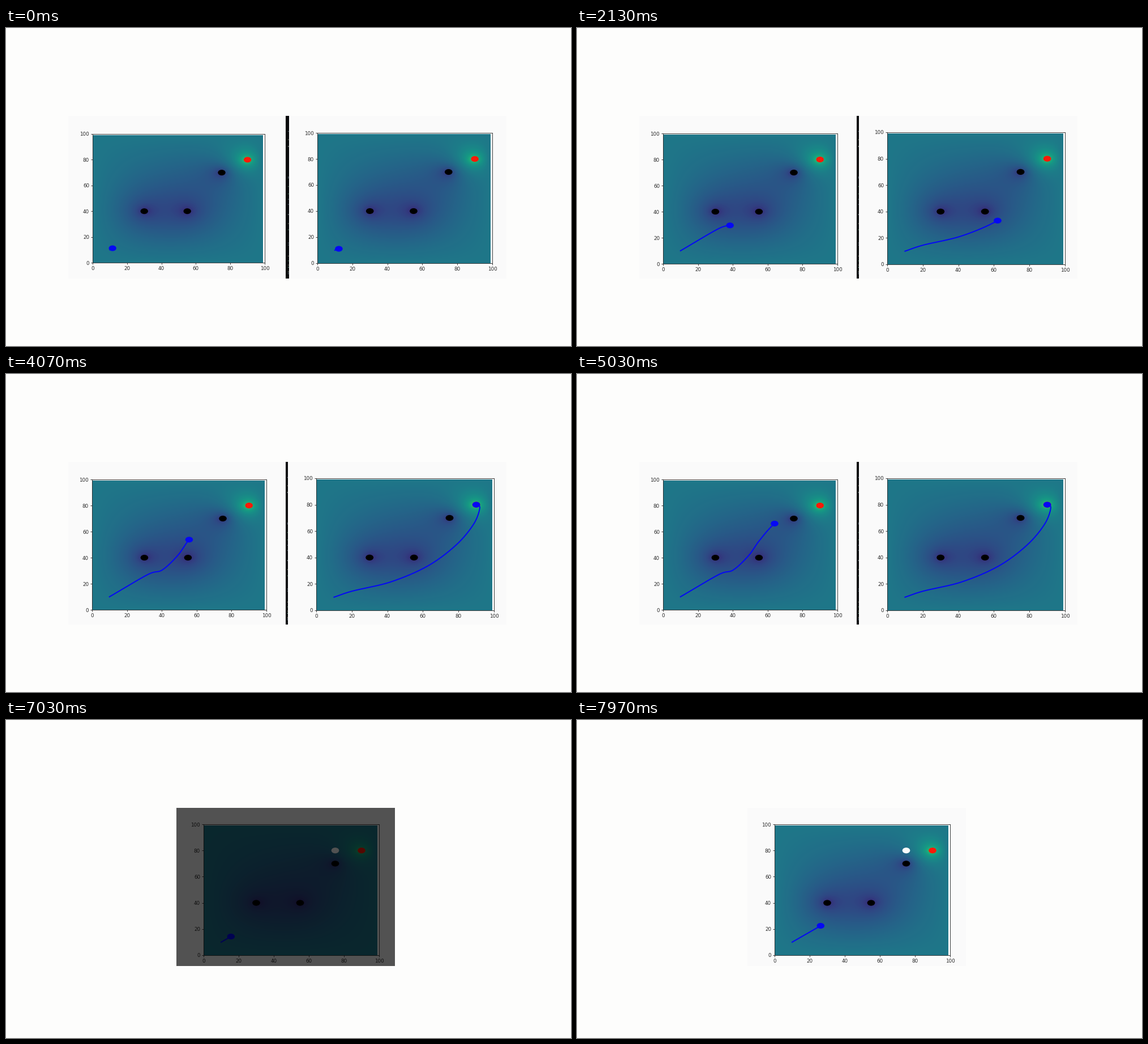
Recreate the animation shown at these times as a matplotlib script. Size 998x561 px, loop 8 s.

```python
import numpy as np
import matplotlib.pyplot as plt
from matplotlib.animation import FuncAnimation
from matplotlib.colors import ListedColormap
from matplotlib.patches import Circle, Rectangle

W, H, DPI = 998, 561, 100
STEP, LOOP = 32, 8000
PX = 72 / DPI
CUT, FADE, SETTLE, ARRIVE = 6.68, 1.0, 0.2, 4.08
GOAL = (90, 80)
WALLS = [(30, 40), (55, 40), (75, 70)]
BLUE, RED, INK, PANEL = "#0508f5", "#fb1a08", "#2a2a2a", "#fafafa"

plt.rcParams["font.family"] = "DejaVu Sans"
fig = plt.figure(figsize=(W / DPI, H / DPI), dpi=DPI, facecolor="#fdfdfc")


def layer(z):
    ax = fig.add_axes([0, 0, 1, 1], zorder=z)
    ax.set(xlim=(0, W), ylim=(H, 0))
    ax.axis("off")
    return ax


def rect(ax, x0, y0, x1, y1, color):
    return ax.add_patch(Rectangle((x0, y0), x1 - x0, y1 - y0, fc=color, lw=0))


def harmonic(n=100, edge=0.41, rounds=5000):
    """Relax Laplace's equation with fixed edges, wells at walls, a peak at the goal."""
    v = np.full((n, n), edge)
    for _ in range(rounds):
        for x, y in WALLS:
            v[y, x] = 0
        v[GOAL[1], GOAL[0]] = 1
        v[1:-1, 1:-1] = (v[:-2, 1:-1] + v[2:, 1:-1] + v[1:-1, :-2] + v[1:-1, 2:]) / 4
    return v


tint = plt.get_cmap("viridis")(np.linspace(0, 1, 256)) * [0.75, 0.97, 0.96, 1]
CMAP = ListedColormap(tint)
FIELD = harmonic()


def place(ax, box):
    x0, y0, x1, y1 = np.round(box)
    ax.set_position([x0 / W, 1 - y1 / H, (x1 - x0) / W, (y1 - y0) / H])


def spline(points, n=40):
    """Catmull-Rom curve through the points."""
    p = np.array(points, float)
    p = np.vstack([2 * p[0] - p[1], p, 2 * p[-1] - p[-2]])
    u = np.linspace(0, 1, n, endpoint=False)[:, None]
    out = []
    for a, b, c, d in zip(p, p[1:], p[2:], p[3:]):
        out.append(0.5 * (2 * b + (c - a) * u + (2 * a - 5 * b + 4 * c - d) * u ** 2
                          + (3 * b - a - 3 * c + d) * u ** 3))
    return np.vstack(out + [p[-2:-1]])


class Plot:
    """One potential map with a dot that walks a curve and leaves a trail."""

    def __init__(self, box, points, travel, extra=None):
        self.path, self.travel = spline(points), travel
        steps = np.hypot(*np.diff(self.path, axis=0).T)
        self.s = np.concatenate([[0], np.cumsum(steps)])

        self.ax = ax = fig.add_axes([0, 0, 1, 1], zorder=2)
        place(ax, box)
        ax.imshow(FIELD, cmap=CMAP, vmin=0, vmax=1, origin="lower",
                  extent=(0, 99, 0, 99), aspect="auto", interpolation="bilinear")
        ticks = range(0, 101, 20)
        ax.set(xlim=(0, 100), ylim=(0, 100), xticks=ticks, yticks=ticks)
        ax.tick_params(labelsize=8.8 * PX, length=3.3 * PX, width=0.9 * PX,
                       pad=2.6 * PX, labelcolor=INK, color=INK)
        for s in ax.spines.values():
            s.set(linewidth=0.9 * PX, color=INK)
        for p in WALLS:
            self.disc(p, "black")
        self.disc(GOAL, RED)
        if extra:
            self.disc(extra, PANEL)
        self.trail, = ax.plot([], [], color=BLUE, lw=2 * PX, zorder=5)
        self.dot = self.disc((10, 10), BLUE, 6)

    def disc(self, p, color, z=4):
        return self.ax.add_patch(Circle(p, 2.2, fc=color, lw=0, zorder=z))

    def draw(self, t, nudge=0):
        d = self.travel(t)
        tip = np.array([np.interp(d, self.s, xy) for xy in self.path.T])
        self.trail.set_data(*np.vstack([self.path[self.s < d], tip]).T)
        self.dot.center = tuple(tip + nudge)


back, front = layer(1), layer(9)
pair_bg = rect(back, 110, 155, 884, 442, PANEL)
strip = rect(back, 494, 155, 498, 442, "#08090b")
rng = np.random.default_rng(4)
speck_y = rng.uniform(160, 438, 24)
specks = back.scatter(0 * speck_y, speck_y, s=1, lw=0,
                      c=rng.choice(["#4f8a60", "#6a7a8a", "#8a8a70"], 24))
solo_bg = rect(back, 301, 155, 687, 434, PANEL)
veil = rect(front, 301, 155, 687, 434, "black")

# axes boxes while the windows open, and once settled
LEFT = np.array([[153, 187, 457, 414], [152, 186, 460, 416]])
RIGHT = np.array([[549.6, 184.6, 859, 415], [548, 184, 862, 417]])

left = Plot(LEFT[0],
            [(10, 10), (31.9, 27), (40.3, 30.6), (49.1, 41.6), (54.6, 52),
             (63, 65), (72.8, 74.4), (78.9, 78.2), (90, 80)],
            lambda t: 2 + 15.5 * t)
right = Plot(RIGHT[0],
             [(10, 10), (20.3, 14.6), (42, 21.6), (62.7, 33.6), (78.6, 49.4),
              (88.5, 65.2), (92, 77.5), GOAL],
             lambda t: 2.5 + 23.2 * t + 1.3 * t ** 2)
solo = Plot((349, 184, 659, 415), [(10, 10), (30, 25.4)],
            lambda t: 14 * (t - 6.505), extra=(75, 80))
pair_parts = [pair_bg, strip, specks, left.ax, right.ax]
solo_parts = [solo_bg, veil, solo.ax]


def update(i):
    t = i * STEP / 1000
    paired = t < CUT
    for a in pair_parts:
        a.set_visible(paired)
    for a in solo_parts:
        a.set_visible(not paired)
    if not paired:
        veil.set_alpha(1 - min(1, (t - CUT) / FADE))
        solo.draw(t)
        return

    k = 1 - (1 - min(1, t / SETTLE)) ** 2
    place(left.ax, LEFT[0] + k * (LEFT[1] - LEFT[0]))
    place(right.ax, RIGHT[0] + k * (RIGHT[1] - RIGHT[0]))
    strip.set_width(5.7 - 2 * k)
    specks.set_offsets(np.c_[0 * speck_y + 498.8 - 1.8 * k, speck_y])

    # the right dot overshoots back and forth at the goal
    overshoot = t > ARRIVE and int(t / 0.132) % 2
    left.draw(t)
    right.draw(t, 0.75 * overshoot)


anim = FuncAnimation(fig, update, frames=LOOP // STEP, interval=STEP,
                     init_func=lambda: update(0), repeat=True, repeat_delay=0)
plt.show()
```
